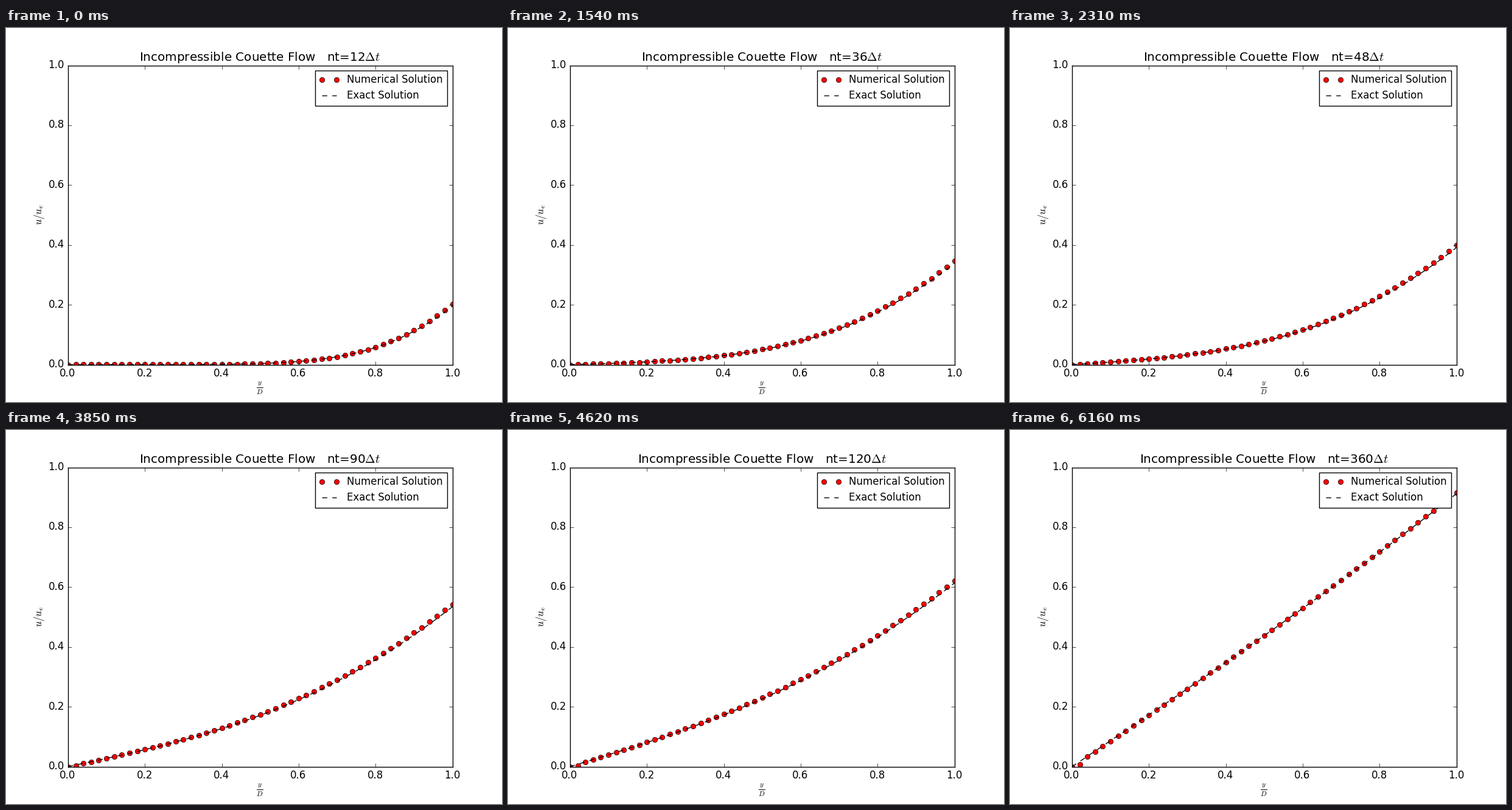
Recreate the animation shown at these times as a matplotlib script. Size 815 by 615 pixels, loop 6930 ms.

```python
import numpy as np
import matplotlib.pyplot as plt
from matplotlib.animation import FuncAnimation
from matplotlib.text import Text
from matplotlib.transforms import Affine2D

W, H, DPI = 815, 615, 100
STEPS = [12, 24, 36, 48, 60, 90, 120, 240, 360]
N = 50
DY = 1 / N
DT = 0.0025
R = DT / DY**2

plt.style.use("classic")
plt.rcParams.update({
    "font.family": "DejaVu Sans",
    "figure.dpi": DPI,
    "savefig.dpi": DPI,
    "figure.facecolor": "white",
    "savefig.facecolor": "white",
    "legend.fontsize": "medium",
})

y = np.linspace(0, 1, N + 1)


def exact(t):
    """Series solution for a fixed lower wall and unit shear at the top."""
    k = (2 * np.arange(60) + 1) * np.pi / 2
    sign = (-1.0) ** np.arange(60)
    return y - np.sin(np.outer(y, k)) @ (2 * sign / k**2 * np.exp(-k**2 * t))


def solve(marks):
    """Crank-Nicolson profiles at the given step counts."""
    m = N - 1
    diag = 1 + R
    a = diag * np.eye(m) - R / 2 * (np.eye(m, k=1) + np.eye(m, k=-1))
    a[-1, -1] -= R / 2
    inv = np.linalg.inv(a)
    u = np.zeros(N + 1)
    saved = {}
    for n in range(1, max(marks) + 1):
        rhs = R / 2 * (u[:-2] + u[2:]) + (1 - R) * u[1:-1]
        first = rhs[0] / diag
        rhs[-1] += R / 2 * DY
        u[1:-1] = inv @ rhs
        u[1] = first  # the node next to the wall is not back-substituted
        u[-1] = u[-2] + DY
        if n in marks:
            saved[n] = u.copy()
    return saved


profiles = solve(STEPS)

fig = plt.figure(figsize=(W / DPI, H / DPI), dpi=DPI)
ax = fig.add_axes([0.125, 0.1, 0.775, 0.8])
dots, = ax.plot([], [], "ro", label="Numerical Solution")
line, = ax.plot([], [], "k--", label="Exact Solution")
ax.set(xlim=(0, 1), ylim=(0, 1))
ax.set_xlabel(r"$\frac{y}{D}$", labelpad=2.6)
ax.set_ylabel(r"$u/u_e$", labelpad=2)
title = ax.set_title("")
ax.legend(loc="upper right")

# snap text to the pixel up and left instead of to the nearest one
fig.canvas.draw()
snap = Affine2D().translate(-0.5, 0.5)
for text in ax.findobj(Text):
    text.set_transform(text.get_transform() + snap)


def draw(i):
    n = STEPS[i]
    dots.set_data(y, profiles[n])
    line.set_data(y, exact(n * DT))
    title.set_text(rf"Incompressible Couette Flow   nt={n}$\Delta t$")
    return dots, line, title


anim = FuncAnimation(fig, draw, frames=len(STEPS), interval=770,
                     repeat=True, repeat_delay=0, blit=False)
plt.show()
```
